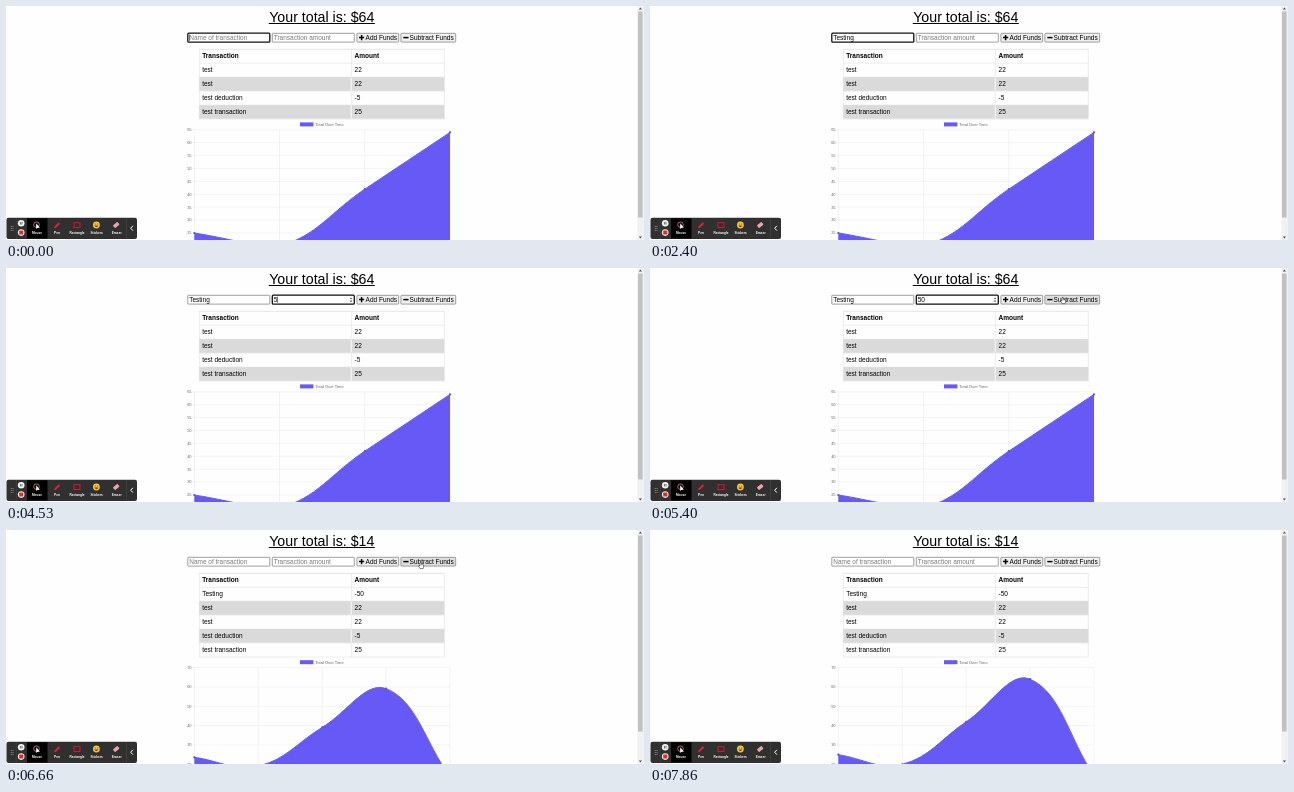
Recreate the animation shown at these times as an HTML page. Size 638 by 234 pixels, loop 8 s.

```html
<!DOCTYPE html>
<html lang="en">
<head>
<meta charset="utf-8">
<title>Budget tracker</title>
<style>
html, body { margin: 0; width: 100%; height: 100%; overflow: hidden; background: #fefefe; }
svg { display: block; font-family: "Liberation Sans", Arial, sans-serif; }
</style>
</head>
<body>
<svg id="stage" width="638" height="234" viewBox="0 0 638 234"></svg>
<script>
const LOOP = 8000, CLICK = 6130, UPDATE = 6200, CHART_START = 6210, CLEARED = 6400;
const PURPLE = '#6659f6';
const stage = document.getElementById('stage');

const text = (x, y, size, str, attrs = '') =>
  `<text x="${x}" y="${y}" font-size="${size}" ${attrs}>${str}</text>`;
const rect = (x, y, w, h, fill, attrs = '') =>
  `<rect x="${x}" y="${y}" width="${w}" height="${h}" fill="${fill}" ${attrs}/>`;
const path = (d, attrs = '') => `<path d="${d}" ${attrs}/>`;
const circle = (x, y, r, fill, attrs = '') =>
  `<circle cx="${x}" cy="${y}" r="${r}" fill="${fill}" ${attrs}/>`;

// Latest entry of a [time, value] list
const latest = (list, t) => list.filter(e => e[0] <= t).pop();

const nameKeys = [[0, ''], [1200, 'T'], [1400, 'Te'], [1530, 'Tes'], [1600, 'Test'],
  [1730, 'Testi'], [1800, 'Testin'], [1860, 'Testing'], [CLEARED, '']];
const amountKeys = [[0, ''], [3200, ''], [4530, '5'], [4660, '50'], [CLEARED, '']];
const cursorPath = [[0, 398, 238], [4800, 398, 238], [5400, 412, 30], [6300, 412, 30],
  [6600, 414, 33], [7000, 414, 33], [7730, 398, 238], [LOOP, 398, 238]];

function cursorAt(t) {
  const i = cursorPath.findIndex(k => k[0] > t);
  const [t0, x0, y0] = cursorPath[i - 1], [t1, x1, y1] = cursorPath[i];
  const p = (t - t0) / (t1 - t0), e = p * p * (3 - 2 * p);
  return [x0 + (x1 - x0) * e, y0 + (y1 - y0) * e];
}

function field(x, placeholder, keys, focused, t) {
  const [since, value] = latest(keys, t);
  let out = focused
    ? rect(x + .3, 27.2, 82, 9, '#fff', 'rx="1" stroke="#101010" stroke-width="1.3"')
    : rect(x + .3, 27.3, 82, 8.8, '#fff', 'rx=".4" stroke="#777" stroke-width=".7"');
  out += text(x + 1.7, 34, 6.5, value || placeholder, value ? '' : 'fill="#7b7b7b"');
  if (focused && (t - since) % 1060 < 540)
    out += rect(x + 1.9 + textWidth(value), 28.5, .5, 6.4, '#000');
  return out;
}

const measure = document.createElement('canvas').getContext('2d');
measure.font = '65px "Liberation Sans", Arial, sans-serif';
const textWidth = str => measure.measureText(str).width / 10;

function button(x, w, label, icon, hover) {
  return rect(x, 27.3, w, 8.8, hover ? '#dedede' : '#efefef',
    'rx=".8" stroke="#777" stroke-width=".7"') +
    path(icon, 'stroke="#000" stroke-width="1.5"') + text(x + 8.7, 34, 6.5, label);
}

function table(rows) {
  const bottom = 43.3 + 13.95 * (rows.length + 1);
  let out = '', lines = `M193.3 43.3H438.3V${bottom}H193.3ZM345.3 43.3V${bottom}`;
  [['Transaction', 'Amount'], ...rows].forEach(([name, amount], i) => {
    const y = 43.3 + i * 13.95, weight = i ? '' : 'font-weight="bold"';
    if (i && i % 2 == 0)
      out += rect(193.3, y, 151.4, 13.6, '#dadada') + rect(346, y, 92.3, 13.6, '#dadada');
    out += text(196.2, y + 9.1, 6.5, name, weight) + text(348.6, y + 9.1, 6.5, amount, weight);
    lines += `M193.3 ${y}H438.3`;
  });
  return path(lines, 'fill="none" stroke="#dfe1e4" stroke-width=".6"') + out;
}

function chart({ values, top, max, min, tick, gap }, progress) {
  const left = 188.3, width = 255.7, bottom = top + (max - min) / tick * gap;
  const pts = values.map((v, i) =>
    [left + i * width / (values.length - 1), top + (max - v) / tick * gap]);
  const rise = y => bottom + (y - bottom) * progress;
  const at = ([x, y]) => `${x.toFixed(2)} ${rise(y).toFixed(2)}`;

  let grid = '', out = '';
  for (let v = max, y = top; v >= min; v -= tick, y += gap) {
    grid += `M186 ${y}H444`;
    out += text(185.6, y + 1.3, 4, v, 'fill="#666" text-anchor="end"');
  }
  for (const [x] of pts) grid += `M${x} ${top}V${bottom + 3}`;

  // Cubic spline with tension 0.4, handles capped to the plot area
  const dist = (a, b) => Math.hypot(a[0] - b[0], a[1] - b[1]);
  const cap = y => Math.min(bottom, Math.max(top, y));
  const handles = pts.map((p, i) => {
    const a = pts[i - 1] || p, b = pts[i + 1] || p;
    const before = dist(a, p), after = dist(p, b), k = .4 / (before + after);
    const handle = f => [p[0] + f * (b[0] - a[0]), cap(p[1] + f * (b[1] - a[1]))];
    return [handle(-before * k), handle(after * k)];
  });
  let curve = 'M' + at(pts[0]);
  for (let i = 1; i < pts.length; i++)
    curve += `C${at(handles[i - 1][1])} ${at(handles[i][0])} ${at(pts[i])}`;

  return path(grid, 'stroke="#e9e9e9" stroke-width=".5"') + out +
    rect(294, top - 7.4, 13.4, 4, PURPLE) +
    text(309.3, top - 4, 4.05, 'Total Over Time', 'fill="#666"') +
    path(`${curve}V${bottom}H${left}Z`, `fill="${PURPLE}"`) +
    path(curve, `fill="none" stroke="${PURPLE}"`) +
    pts.map(p => circle(p[0], rise(p[1]), 1.1, '#5a4ee0')).join('');
}

function scrollbar(end) {
  return rect(631.4, 0, 6.6, 234, '#f1f1f1') + rect(632, 5.5, 4.6, end - 5.5, '#c1c1c1') +
    path('M632.8 3.4L634.4 1.6L636 3.4ZM632.8 230.6L634.4 232.4L636 230.6Z', 'fill="#505050"');
}

function toolbar() {
  const labels = [[31, 'Mouse'], [51, 'Pen'], [71, 'Rectangle'], [90.7, 'Stickers'], [110.7, 'Eraser']];
  let dots = '';
  for (let i = 0; i < 6; i++) dots += circle(5.2 + i % 2 * 1.8, 220.4 + (i >> 1) * 2, .5, '#aaa');
  return rect(.5, 211.8, 130.5, 21.2, '#303030', 'rx="2"') + dots +
    rect(21, 212.3, 20.5, 20.2, '#000') +
    path('M10.3 212V233M120.5 212V233', 'stroke="#4b4b4b" stroke-width=".5"') +
    circle(15.2, 217.2, 3.3, '#f4f4f4') +
    path('M14.4 215.9V218.5M16 215.9V218.5', 'stroke="#333" stroke-width=".7"') +
    circle(15.2, 226.6, 3.3, '#f3eeee') + rect(13.2, 224.6, 4, 4, '#d93025', 'rx=".7"') +
    circle(30.5, 218.7, 2.8, 'none', 'stroke="#e08a8a" stroke-width=".8"') +
    path('M30.2 217.3V223L31.6 221.8L33.9 221.7Z', 'fill="#fff"') +
    path('M49 221.4L53.4 217', 'stroke="#e3203c" stroke-width="2"') +
    path('M48.2 222.3L48.7 220.5L50 221.8Z', 'fill="#e3203c"') +
    rect(68, 216.7, 6, 4.8, 'none', 'stroke="#d5142f" stroke-width="1"') +
    circle(90.4, 219, 3.4, '#f8c73a') +
    path('M88.4 219.6Q90.4 223 92.4 219.6Z', 'fill="#7a3d12"') +
    circle(89.2, 218, .5, '#533') + circle(91.6, 218, .5, '#533') +
    rect(107.2, 217.3, 6, 3.4, '#f1a3ad', 'rx=".8" transform="rotate(-40 110.2 219)"') +
    labels.map(([x, s]) => text(x, 228, 3.2, s,
      'fill="#fff" font-weight="bold" text-anchor="middle"')).join('') +
    path('M126.9 219.8L124.7 222.2L126.9 224.6', 'fill="none" stroke="#fff" stroke-width="1"');
}

function pointer(x, y, overButton) {
  const shape = overButton
    ? 'v3l-1-.6l-.6.6l1.6 2.6h3.2l.6-2.6l-.4-1l-2-.4v-1.8q-.7-.8-1.4.2Z'
    : 'v5.4l1.3-1.2l.9 2l.9-.4l-.9-1.9h1.7Z';
  return path(`M${x} ${y}${shape}`, 'fill="#fff" stroke="#111" stroke-width=".5"');
}

function clickRing(t) {
  const p = (t - CLICK) / 330;
  if (p < 0 || p > 1) return '';
  return circle(413, 33, 3.5 + 4 * p, 'none',
    `stroke="#e0453f" stroke-width=".8" opacity="${1 - p * .6}"`);
}

const oldRows = [['test', 22], ['test', 22], ['test deduction', -5], ['test transaction', 25]];
const before = { total: 64, rows: oldRows, scrollEnd: 211.5,
  chart: { values: [25, 20, 42, 64], top: 123.8, max: 65, min: 20, tick: 5, gap: 12.9 } };
const after = { total: 14, rows: [['Testing', -50], ...oldRows], scrollEnd: 201.5,
  chart: { values: [25, 20, 42, 64, 14], top: 137.6, max: 70, min: 10, tick: 10, gap: 19.35 } };

function draw(t) {
  const state = t < UPDATE ? before : after;
  const p = Math.min(1, Math.max(0, (t - CHART_START) / 1000));
  const progress = state === before ? 1 : 1 - (1 - p) ** 4;
  const [x, y] = cursorAt(t);
  const hover = x > 394 && x < 450 && y > 27 && y < 37;
  const amountFocused = t >= 3130 && t < CLICK;

  stage.innerHTML =
    text(315.8, 15.6, 14.2, 'Your total is: $' + state.total, 'text-anchor="middle"') +
    rect(262.8, 17, 106, 1, '#000') +
    field(181.5, 'Name of transaction', nameKeys, t < 3130, t) +
    field(266, 'Transaction amount', amountKeys, amountFocused, t) +
    (amountFocused ? path('M343.7 31L345 29.4L346.3 31ZM343.7 32.6L345 34.2L346.3 32.6Z', 'fill="#555"') : '') +
    button(350.9, 41.8, 'Add Funds', 'M353 31.6H358.2M355.6 29V34.2', false) +
    button(394.9, 54.8, 'Subtract Funds', 'M397.3 31.6H402.5', hover) +
    table(state.rows) + chart(state.chart, progress) +
    scrollbar(state.scrollEnd) + toolbar() +
    clickRing(t) + pointer(x, y, hover);
}

const start = performance.now();
function tick() {
  draw((performance.now() - start) % LOOP);
  requestAnimationFrame(tick);
}
tick();
</script>
</body>
</html>
```
